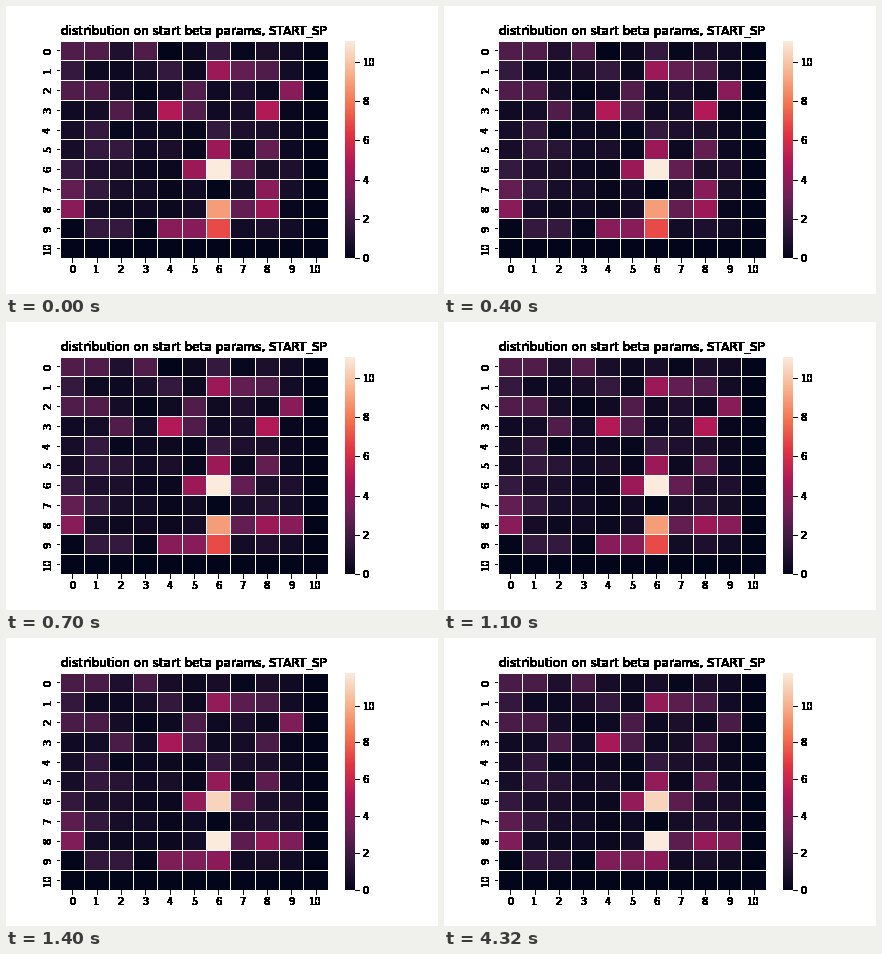
A matplotlib script that plays this animation: 432 by 288 pixels, repeating every 6.2 s.

```python
import numpy as np
import matplotlib.pyplot as plt
from matplotlib.animation import FuncAnimation
from matplotlib.colors import LinearSegmentedColormap

STEP_MS, LOOP_MS = 100, 6200
SIZE = 11

# Evenly spaced stops from near black through crimson to cream
ramp = LinearSegmentedColormap.from_list("ramp", [
    "#03051A", "#35193E", "#701F57", "#AD1759",
    "#E13342", "#F37651", "#F6B48F", "#FAEBDD"])

# Cells that stand out, as row and column digits, by value
PEAKS = {
    11.09: "66",
    8.9: "86",
    6.9: "96",
    4.9: "34 38",
    4.3: "16 56 65 88",
    3.8: "29 78 80 94 95",
    2.8: "17 58 67 70 87",
    2.3: "00 01 03 18 20 21 25 32 35",
    1.6: "06 10 14 41 46 51 52 60 71 91 92",
}

# Time in ms and the cells that take a new value
MOVES = [
    (400, {"52": 1.2}),
    (700, {"78": 1.1, "89": 3.8}),
    (1100, {"04": 0.7, "06": 0.7}),
    (1400, {"38": 2.3, "86": 11.79, "96": 4.1}),
    (1500, {"29": 2.3}),
]


def put(grid, cell, value):
    grid[int(cell[0]), int(cell[1])] = value


def start_grid():
    """Faint random background with the peaks on top; last row and column empty."""
    grid = np.zeros((SIZE, SIZE))
    grid[:-1, :-1] = np.random.default_rng(4).uniform(0, 0.9, (SIZE - 1, SIZE - 1))
    put(grid, "04", 0)
    for value, cells in PEAKS.items():
        for cell in cells.split():
            put(grid, cell, value)
    return grid


def grid_at(ms):
    grid = START.copy()
    for when, cells in MOVES:
        if ms >= when:
            for cell, value in cells.items():
                put(grid, cell, value)
    return grid


def solid(img, dpi):
    """Turn every touched pixel fully black, for hard-edged text."""
    out = np.zeros_like(img)
    out[..., 3] = img[..., 3] > 0
    return out, 0, 0


START = start_grid()

plt.rcParams.update({"font.family": "DejaVu Sans", "font.size": 10})
fig, ax = plt.subplots(figsize=(6, 4), dpi=72, facecolor="white")
fig.subplots_adjust(left=0.125, right=0.9, bottom=0.125, top=0.88)

mesh = ax.pcolormesh(START, cmap=ramp, vmin=0, vmax=START.max(),
                     edgecolors="white", linewidths=1, zorder=3)
ax.set(xlim=(0, SIZE), ylim=(SIZE, 0))
ax.spines[:].set_visible(False)
centres = np.arange(SIZE) + 0.5
ax.set_xticks(centres, range(SIZE))
ax.set_yticks(centres, range(SIZE), rotation="vertical", va="center")
ax.set_title("distribution on start beta params, START_SP", fontsize=12)

bar = fig.colorbar(mesh, ax=ax, ticks=range(0, 12, 2))
bar.outline.set_visible(False)

for part in (ax.title, ax.xaxis, ax.yaxis, bar.ax.yaxis):
    part.set_agg_filter(solid)


def draw(i):
    grid = grid_at(i * STEP_MS)
    mesh.set_array(grid)
    mesh.set_clim(0, grid.max())
    return [mesh]


anim = FuncAnimation(fig, draw, frames=LOOP_MS // STEP_MS, interval=STEP_MS,
                     repeat=True, repeat_delay=0, blit=False)
plt.show()
```
